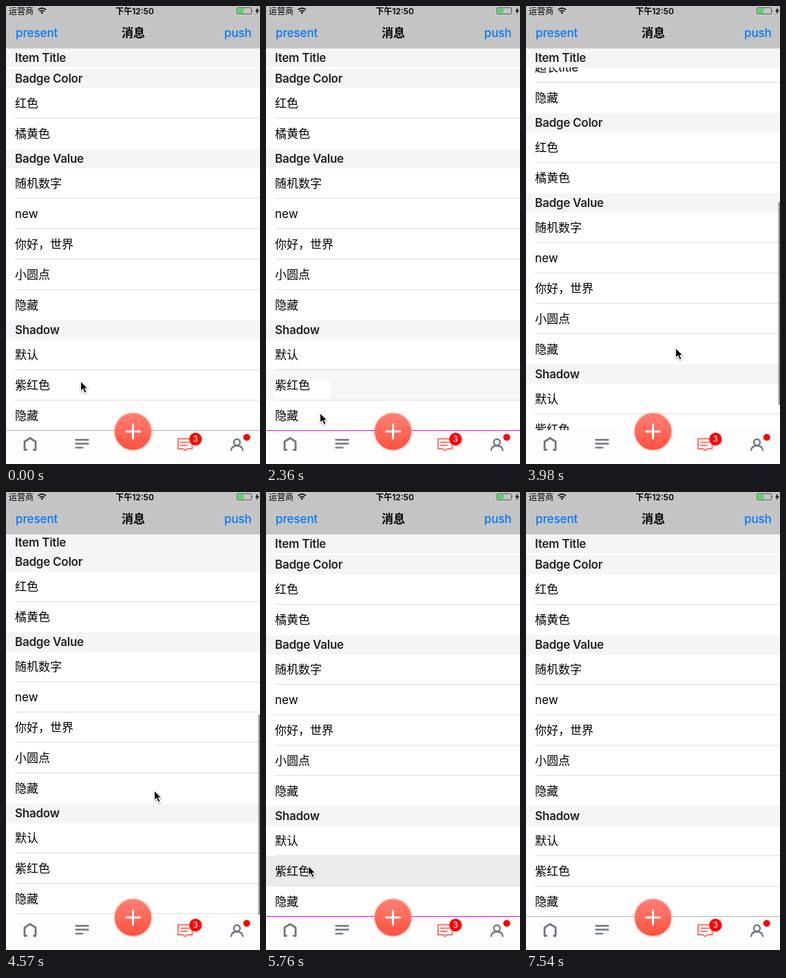
An HTML page that plays this animation: 369 by 663 pixels, repeating every 8.61 s.

```html
<!DOCTYPE html>
<html lang="zh-CN">
<head>
<meta charset="utf-8">
<style>
  html, body { margin: 0; width: 100%; height: 100%; overflow: hidden; background: #fff; }
  svg { display: block; width: 369px; height: 663px; font: 17px Inter, "Noto Sans CJK SC", "Noto Sans CJK", sans-serif; }
  .head { font-weight: 600; fill: #222; letter-spacing: -.25px; }
  .link { font-weight: 500; fill: #007aff; letter-spacing: -.1px; }
  .mid { text-anchor: middle; }
  .tab { font-size: 10px; text-anchor: middle; fill: #929292; }
  .icon { fill: none; stroke: #6f7780; stroke-width: 2.3; stroke-linecap: round; stroke-linejoin: round; }
</style>
</head>
<body>
<svg viewBox="0 0 369 663">
  <defs>
    <linearGradient id="coral" x2="0" y2="1">
      <stop stop-color="#ff8174"/><stop offset="1" stop-color="#ff513f"/>
    </linearGradient>
    <filter id="blur"><feGaussianBlur stdDeviation="1.2"/></filter>
  </defs>

  <g id="list"></g>
  <g id="sticky"></g>
  <rect id="bar" x="366.5" width="2.5" rx="1.2" fill="#000" opacity=".4"/>

  <g id="navigation">
    <rect width="369" height="61.5" fill="#c4c4c4"/>
    <text x="4" y="11.5" font-size="12">运营商</text>
    <g fill="none" stroke="#000" stroke-width="1.7">
      <path d="M46.5 5.5a8.2 8.2 0 0 1 11.6 0M48.8 8a5 5 0 0 1 7 0"/>
    </g>
    <path d="M50.5 9.4a2.6 2.6 0 0 1 3.6 0l-1.8 2z"/>
    <text x="187" y="11.5" font-size="12" font-weight="600" class="mid">下午12:50</text>
    <rect x="335.5" y="2.5" width="21" height="9" rx="1.6" fill="none" stroke="#555" stroke-width=".9"/>
    <rect x="336.6" y="3.6" width="8.6" height="6.8" fill="#4cd964"/>
    <path d="M357.3 5.2q1.8 1.8 0 3.6z" fill="#555"/>
    <path d="M366 2l-4 5.4h2.6L363.4 12l4.6-5.8h-2.8z"/>
    <text x="14" y="45" class="link">present</text>
    <text x="185" y="45.3" font-weight="600" class="mid">消息</text>
    <text x="317" y="45" class="link">push</text>
  </g>

  <g id="tabs">
    <rect y="614" width="369" height="49" fill="#fdfdfd"/>
    <rect id="shadow" y="614" width="369" height="1"/>
    <circle cx="184.5" cy="616" r="27.5" fill="#ff8a7c" opacity=".65" filter="url(#blur)"/>
    <circle cx="184.5" cy="616" r="26.5" fill="url(#coral)"/>
    <path d="M174.5 616h20M184.5 606v20" stroke="#fff" stroke-width="3" stroke-linecap="round"/>
    <g class="icon">
      <path d="M29.5 642.5H27V630.5L35 625.5 43 630.5V642.5H40.5" stroke-width="2.8"/>
      <path d="M101.500 628h18M101.500 633.500h18M101.500 639.300h10"/>
      <circle cx="335.500" cy="631.500" r="4.500"/>
      <path d="M327 643q1-6.500 8.500-6.500t8.500 6.500"/>
      <path d="M250 626.500h20.500v14.500h-7l-3.300 2.500-3.200-2.500h-7zM254 631.500h12M254 636h9" stroke="#ff7566" stroke-width="2"/>
    </g>
    <circle cx="275.3" cy="627" r="9.2" fill="#f00"/>
    <text x="275.3" y="631.300" font-size="12" fill="#fff" class="mid">3</text>
    <circle cx="349.700" cy="624.500" r="5" fill="#f00"/>
  </g>

  <path id="cursor" d="M.5 0v14.5l3.300-3 2.600 5.800 2.700-1.200-2.500-5.600h4.400z" stroke="#fff" stroke-width="1.1" style="filter:drop-shadow(0 1px .8px #0006)"/>
</svg>
<script>
const $ = id => document.getElementById(id);
const LOOP = 8610, STEP = 147.8;

const header = (title, y) =>
  `<rect y="${y}" width="369" height="28" fill="#f5f5f5"/><text x="13" y="${y + 20}" class="head">${title}</text>`;
const row = (title, y) =>
  `<rect class="row" y="${y}" width="369" height="43.5" fill="#fff"/><text x="13" y="${y + 28}">${title}</text>`;
const line = y => `<rect x="13" y="${y + 43}" width="356" height="1" fill="#dddde0"/>`;

const sections = [
  ['', '超长title', '隐藏'],
  ['Badge Color', '红色', '橘黄色'],
  ['Badge Value', '随机数字', 'new', '你好，世界', '小圆点', '隐藏'],
  ['Shadow', '默认', '紫红色', '隐藏']
];

let y = 3, markup = '';
sections.forEach(([title, ...rows], s) => {
  if (title) { markup += header(title, y); y += 28; }
  rows.forEach((name, i) => {
    markup += row(name, y);
    if (i < rows.length - 1 || s === sections.length - 1) markup += line(y);
    y += 44;
  });
});
$('list').innerHTML = markup + '<rect id="patch" x="13" y="540" width="81" height="30" fill="#fff"/><text id="patchText" x="13" y="555">紫红色</text>';
$('patchText').setAttribute('y', 555);
$('sticky').innerHTML = header('Item Title', 61);

const [plainRow, purpleRow, hiddenRow] = [...document.querySelectorAll('.row')].slice(-3);

// Poses: [step, values...], linear in between
const pointer = [
  [2, 108, 543], [3, 95, 572], [4, 76, 588], [5, 68, 582], [6, 68, 582], [7, 75, 566],
  [8, 79, 554], [14, 78, 556], [16, 78, 589], [21, 78, 589], [25, 214, 409], [26, 217, 431],
  [27, 217, 495], [28, 217, 499], [29, 217, 483], [31, 215, 432], [34, 205, 436],
  [38, 62, 541], [39, 61, 541], [42, 107, 541], [44, 90, 512], [47, 90, 512], [50, 60, 663]
];
const scroll = [[26, 0], [27, 64], [28, 68], [29, 52], [30, 22], [31, -4], [35, 0]];

function pose(keys, k) {
  const i = keys.findIndex(key => key[0] >= k);
  if (i < 0) return keys[keys.length - 1].slice(1);
  if (i === 0) return keys[0].slice(1);
  const [a, b] = [keys[i - 1], keys[i]], f = (k - a[0]) / (b[0] - a[0]);
  return a.slice(1).map((v, j) => Math.round(v + (b[j + 1] - v) * f));
}

const fade = ['#d9d9d9', '#d9d9d9', '#ebebeb', '#f2f2f2', '#f5f5f5'];
const tapped = (k, start) => fade[k - start] || '#fff';
const show = (id, on) => $(id).style.display = on ? '' : 'none';

function draw(now) {
  const k = Math.floor((now % LOOP) / STEP + .08);
  const [x, top] = pose(pointer, k), [offset] = pose(scroll, k);

  $('list').setAttribute('transform', `translate(0 ${offset})`);
  $('sticky').setAttribute('transform', `translate(0 ${Math.min(0, offset + 2)})`);
  $('bar').setAttribute('y', 318 - offset * (offset > 0 ? .54 : 1));
  $('bar').setAttribute('height', 294 + Math.min(0, offset));
  show('bar', k >= 27 && k < 35);

  const residue = k >= 14 && k < 27;
  plainRow.setAttribute('fill', tapped(k, 46));
  purpleRow.setAttribute('fill', residue ? '#f7f7f7' : tapped(k, k < 27 ? 9 : 37));
  hiddenRow.setAttribute('fill', tapped(k, 19));
  show('patch', residue);
  show('patchText', residue);

  const magenta = k >= 10 && k < 19 || k >= 38 && k < 46;
  $('shadow').setAttribute('fill', magenta ? '#f0f' : '#b0b0b0');
  show('shadow', k < 19 || k >= 38);

  $('cursor').setAttribute('transform', `translate(${x} ${top})`);
  show('cursor', k < 50);
  requestAnimationFrame(() => draw(performance.now()));
}
draw(0);
</script>
</body>
</html>
```
